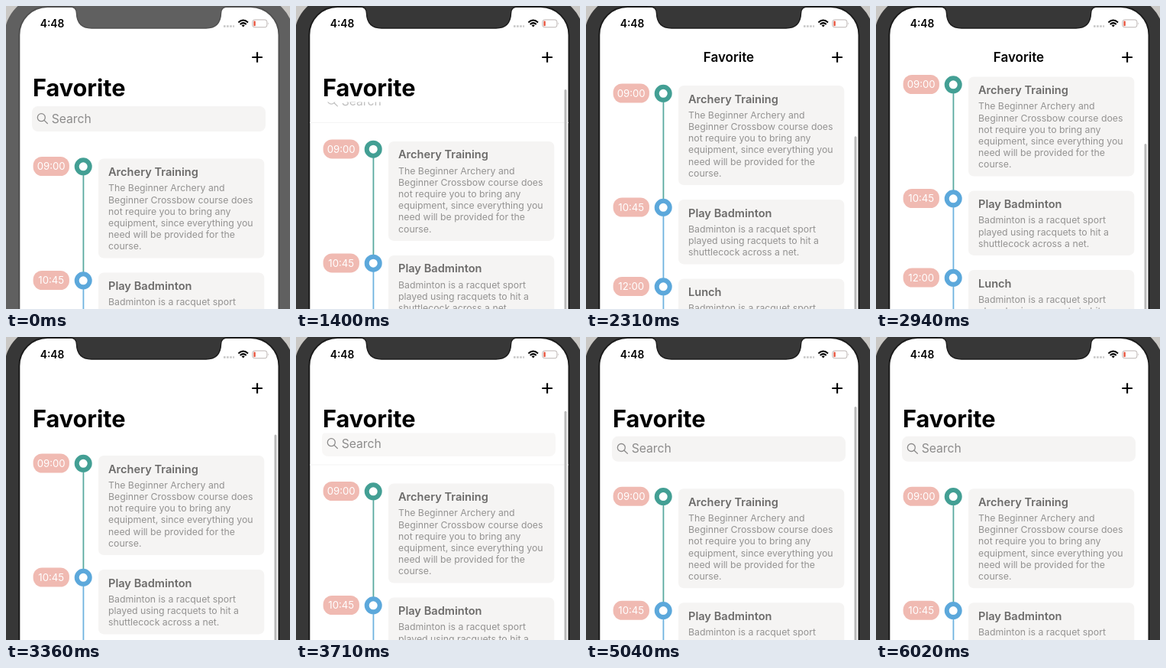
An HTML page that plays this animation: 372x396 px, repeating every 6.44 s.

```html
<!DOCTYPE html>
<html lang="en">
<head>
<meta charset="utf-8">
<title>Favorite list</title>
<style>
html, body { margin: 0; width: 100%; height: 100%; overflow: hidden; }
svg { display: block; width: 372px; height: 396px; font-family: Inter, Roboto, sans-serif; font-optical-sizing: none; }
.pill { font-size: 13.2px; fill: #fff; text-anchor: middle; }
.head { font-size: 14.6px; font-weight: 600; fill: #6c6b6a; }
.body { font-size: 12.3px; fill: #949392; }
</style>
</head>
<body>
<svg viewBox="0 0 372 396">
  <defs>
    <clipPath id="underTitle"><rect y="125.5" width="372" height="271"/></clipPath>
  </defs>
  <rect width="372" height="396" fill="#cac8c5"/>
  <rect class="bezel" x="-2" y="-13" width="379" height="520" rx="52"/>
  <rect class="rim" x="17.3" y="1" width="340.2" height="500" rx="37" fill="#fff" stroke-width="2"/>

  <g id="list"></g>
  <rect id="rule" x="18" y="174.5" width="339" height="1" fill="#f4f4f4"/>

  <g clip-path="url(#underTitle)">
    <g id="search">
      <rect id="field" x="34" y="131" width="306" height="33" rx="8" fill="#f5f4f3"/>
      <g id="hint" fill="none" stroke="#8c8b8b" stroke-width="1.3" stroke-linecap="round">
        <circle cx="46.3" cy="145.7" r="5"/>
        <path d="M50 149.4L54.3 153.5"/>
        <text x="59.7" y="152.7" font-size="15.7" fill="#8c8b8b" stroke="none">Search</text>
      </g>
    </g>
  </g>

  <text id="large" x="34.9" y="117.7" font-size="30.7" font-weight="700">Favorite</text>
  <path d="M55 30H320V88H19V40Z" fill="#fff"/>
  <text id="small" x="187" y="73" font-size="17" font-weight="600" text-anchor="middle">Favorite</text>
  <path d="M322.3 67H335.9M329.1 60.2V73.8" stroke="#000" stroke-width="2.1"/>

  <path class="bezel rim" d="M80 -4V1H84Q92 1 92.4 9Q93 29 112 29H262Q281 29 281.6 9Q282 1 290 1H294V-4Z" stroke-width="1.4"/>
  <text x="44.7" y="27.7" font-size="13.8" font-weight="600">4:48</text>
  <path d="M285 26.5H299" stroke="#c6c6c6" stroke-width="2.6" stroke-dasharray="2.6 1.5"/>
  <g fill="none" stroke="#000" stroke-width="2">
    <path d="M304.4 21.4Q310.7 15.6 317 21.4M306.7 24Q310.7 20.3 314.7 24"/>
    <path d="M308.6 25.2Q310.7 23.6 312.8 25.2L310.7 27.6Z" fill="#000" stroke="none"/>
  </g>
  <rect x="322.9" y="18" width="19" height="9.8" rx="2.8" fill="none" stroke="#bdb5b3"/>
  <rect x="324.4" y="19.5" width="2.4" height="6.8" rx="1" fill="#e8553f"/>
  <path d="M343.3 21.2Q345 22.9 343.3 24.6Z" fill="#bdb5b3"/>

  <rect id="bar" x="351.5" width="3" height="420" rx="1.5" fill="#b9b9b9"/>
</svg>
<script>
const LOOP = 6440, STEP = 70, TEAL = '#439f94', BLUE = '#5ca8db';
const $ = id => document.getElementById(id);
const clamp = v => Math.max(0, Math.min(1, v));

const game = ['Badminton is a racquet sport', 'played using racquets to hit a', 'shuttlecock across a net.'];
const items = [
  { y: 210, time: '09:00', color: TEAL, title: 'Archery Training', gap: 149, lines: [
    'The Beginner Archery and', 'Beginner Crossbow course does', 'not require you to bring any',
    'equipment, since everything you', 'need will be provided for the', 'course.'] },
  { y: 359, time: '10:45', color: BLUE, title: 'Play Badminton', gap: 103.5, lines: game },
  { y: 462.5, time: '12:00', color: BLUE, title: 'Lunch', gap: 103.5, lines: game }
];

const row = ({ y, time, color, title, gap, lines }) => `<g transform="translate(0 ${y})">
  <path d="M101.4 0V${gap}" stroke="${color}" stroke-width="1.8" opacity=".88"/>
  <rect x="35.6" y="-13" width="47.3" height="25" rx="11.5" fill="#f0bab2"/>
  <text class="pill" x="59.2" y="4.2">${time}</text>
  <rect x="121" y="-10.5" width="217.3" height="${38.8 + 15.2 * lines.length}" rx="7" fill="#f5f4f3"/>
  <text class="head" x="134" y="12">${title}</text>
  ${lines.map((s, i) => `<text class="body" x="134" y="${32.3 + 15.2 * i}">${s}</text>`).join('')}
</g>`;
const dot = ({ y, color }) =>
  `<circle cx="101.2" cy="${y - 0.2}" r="8.5" fill="#fff" stroke="${color}" stroke-width="6"/>`;
$('list').innerHTML = items.map(row).join('') + items.map(dot).join('');

// [time, scroll shift]
const path = [[0, 0], [840, 0], [980, -1.2], [1190, -1.2], [1260, -6], [1330, -6], [1400, -22.6],
  [1750, -44.5], [1890, -44.5], [2310, -95.5], [2590, -104], [2660, -104], [2940, -107], [3010, -107],
  [3360, -44.5], [3710, -8], [4130, 9.5], [4410, 4], [4830, -1.2], [LOOP, -1.2]];

function shift(t) {
  const i = path.findIndex(p => p[0] > t);
  const [t0, a] = path[i - 1], [t1, b] = path[i];
  return a + (b - a) * (t - t0) / (t1 - t0);
}

const move = (id, y) => $(id).setAttribute('transform', `translate(0 ${y})`);
const fade = (id, o) => $(id).setAttribute('opacity', o);
const paint = (sel, attr, color) =>
  document.querySelectorAll(sel).forEach(e => e.setAttribute(attr, color));

function draw(now) {
  const t = Math.floor(now % LOOP / STEP) * STEP;
  const d = shift(t);
  const [shade, edge] = t < 910 ? ['#606060', '#505050'] : t < 980 ? ['#4b4b4b', '#363636'] : ['#373737', '#1c1c1c'];
  paint('.bezel', 'fill', shade);
  paint('.rim', 'stroke', edge);

  move('list', d);
  move('search', d);
  fade('field', clamp((18 + d) / 14));
  fade('hint', clamp((37 + d) / 26));
  move('rule', d);
  fade('rule', t >= 1260 && t < 4830 ? clamp((40 + d) / 17) : 0);

  move('large', Math.max(0, d) + Math.min(0, d + 44.5));
  fade('large', d < -92 ? 0 : 1);
  fade('small', clamp((-d - 80) / 12));

  move('bar', 90 - 0.84 * Math.min(0, d));
  fade('bar', t < 1260 || t >= 6020 ? 0 : t >= 5950 ? 0.5 : 1);
}

const start = performance.now();
function tick() {
  draw(performance.now() - start);
  requestAnimationFrame(tick);
}
tick();
</script>
</body>
</html>
```
